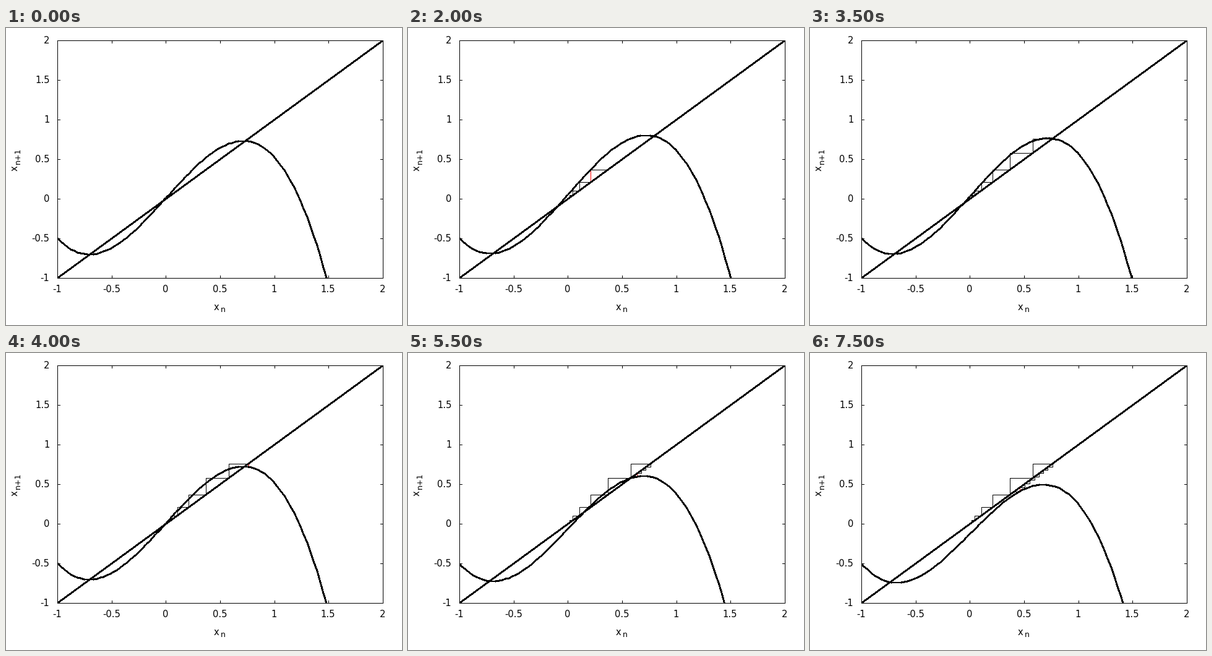
Recreate the animation shown at these times as a matplotlib script. Size 640x480 px, loop 8 s.

```python
import numpy as np
import matplotlib.pyplot as plt
from matplotlib.animation import FuncAnimation
from matplotlib.collections import PolyCollection
from matplotlib.patches import Rectangle

W, H, DPI = 640, 480, 100
LEFT, RIGHT, TOP, BOTTOM = 83, 609, 20, 404
STEPS, INTERVAL = 16, 500
EPS, REST = 0.05, 0.25
PT = 72 / DPI  # points per pixel


def px(x):
    return np.round(LEFT + (np.asarray(x) + 1) * (RIGHT - LEFT) / 3) + 0.5


def py(y):
    return np.round(BOTTOM - (np.asarray(y) + 1) * (BOTTOM - TOP) / 3) + 0.5


def cubic(x, b):
    return 1.5 * x - x**3 + b * (1 + x)


def simulate():
    """Fast variable x follows the cubic map; b drifts slowly against it."""
    xs, bs = [0.0], [EPS * REST]
    for _ in range(STEPS):
        x, b = xs[-1], bs[-1]
        xs.append(cubic(x, b))
        bs.append(b + EPS * (REST - x))
    return np.array(xs), np.array(bs)


def thick(x, y):
    """Two-pixel strips along a polyline, widened across the minor axis."""
    pts = np.column_stack([px(x), py(y)])
    quads = []
    for p, q in zip(pts[:-1], pts[1:]):
        d = q - p
        major = np.argmax(np.abs(d))
        end = d / (2 * abs(d[major]))
        side = np.array([0, 1]) if major == 0 else np.array([1, 0])
        p, q = p - end, q + end
        quads.append([p - 1.5 * side, q - 1.5 * side,
                      q + 0.5 * side, p + 0.5 * side])
    return quads


fig = plt.figure(figsize=(W / DPI, H / DPI), dpi=DPI, facecolor="white")
ax = fig.add_axes([0, 0, 1, 1])
ax.set_xlim(0, W)
ax.set_ylim(H, 0)
ax.axis("off")


def stroke(x, y, color="black", z=2):
    line, = ax.plot(x, y, color=color, lw=PT, zorder=z, snap=False,
                    antialiased=False, solid_joinstyle="miter",
                    solid_capstyle="projecting")
    return line


def label(x, y, s, size=14.7, ha="left", rot=0):
    ax.text(x, y, s, fontsize=size * PT, family="DejaVu Sans", ha=ha,
            va="baseline", rotation=rot, rotation_mode="anchor")


# Frame, ticks and labels
l, r, t, b = LEFT + 0.5, RIGHT + 0.5, TOP + 0.5, BOTTOM + 0.5
stroke([l, r, r, l, l], [t, t, b, b, t], z=6)
for v in np.arange(-1, 2.1, 0.5):
    x, y, s = px(v), py(v), f"{v:g}"
    for edge, d in ((l, 4), (r, -4)):
        stroke([edge, edge + d], [y, y], z=6)
    for edge, d in ((t, 4), (b, -4)):
        stroke([x, x], [edge, edge + d], z=6)
    label(70.5, y + 4.5, s, ha="right")
    label(x - 1, 427, s, ha="center")
label(336, 456, "x")
label(347, 459, "n", 12.5)
label(19, 231, "x", rot=90)
label(23, 220, "n+1", 12.5, rot=90)

# Moving parts
grid = np.linspace(-1, 2, 100)
xs, bs = simulate()
stairs = stroke([], [])
leg = stroke([], [], color="red", z=3)
diagonal = thick([-1, 2], [-1, 2])
curves = PolyCollection([], facecolors="black", edgecolors="none",
                        linewidths=0, antialiaseds=False, zorder=4)
curves.set_snap(False)
ax.add_collection(curves, autolim=False)
curves.set_clip_path(Rectangle((LEFT, TOP), RIGHT - LEFT + 1,
                               BOTTOM - TOP + 1, transform=ax.transData))


def update(k):
    curves.set_verts(diagonal + thick(grid, cubic(grid, bs[k])))
    corners = np.repeat(xs[:k + 2], 2)
    stairs.set_data(px(corners[:-1]), py(corners[1:]))
    leg.set_data(px([xs[k], xs[k]]), py([xs[k], xs[k + 1]]))
    return stairs, leg, curves


anim = FuncAnimation(fig, update, frames=STEPS, interval=INTERVAL,
                     init_func=lambda: update(0), repeat=True,
                     repeat_delay=0, blit=False)
plt.show()
```
